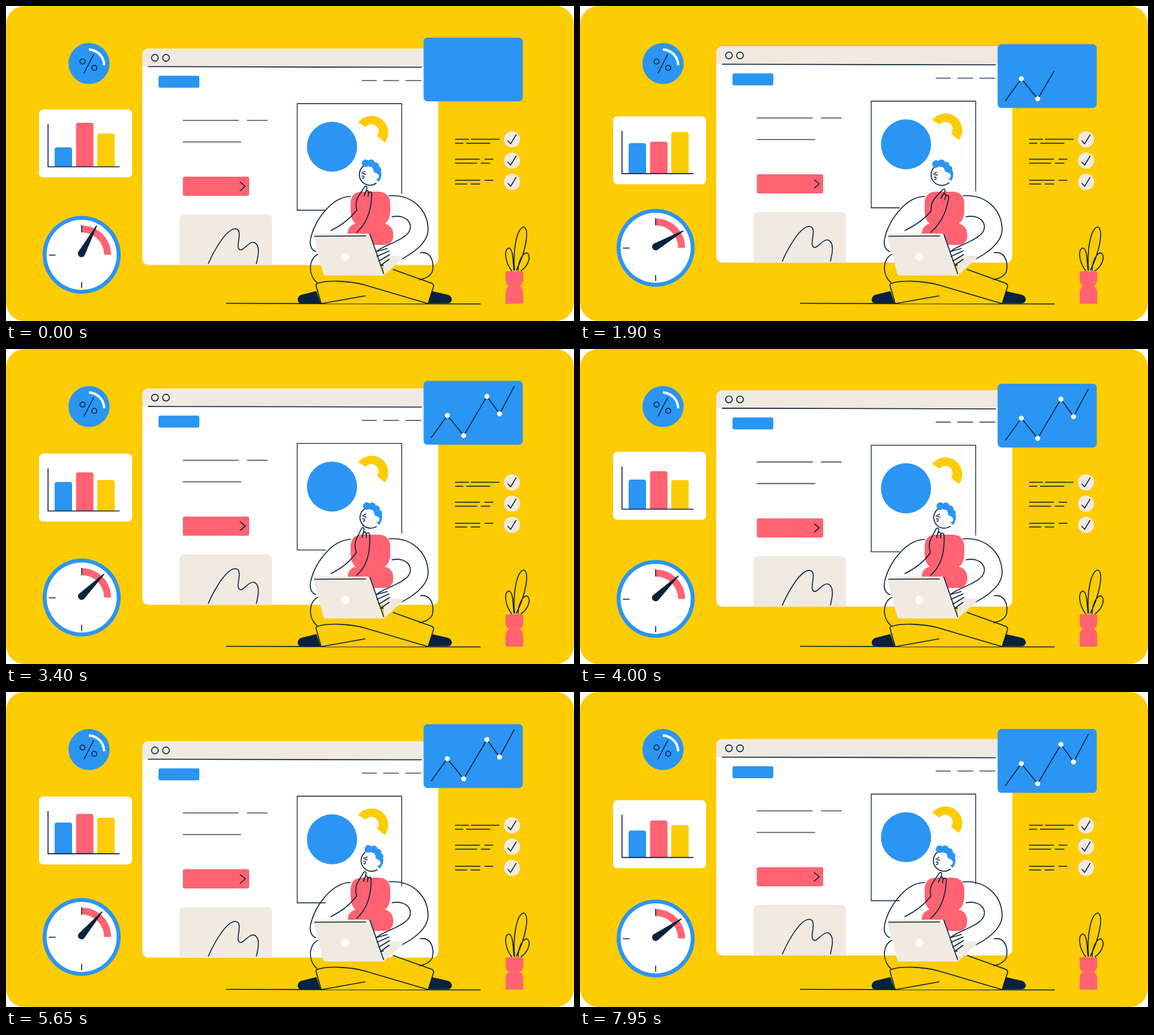
Animation, 946 px wide and 526 px high, one loop 8 s. Source, as an HTML page:

```html
<!DOCTYPE html>
<html lang="en">
<head>
<meta charset="utf-8">
<title>Workspace</title>
<style>
html, body { margin: 0; width: 100%; height: 100%; overflow: hidden; background: #fff; }
svg { display: block; width: 100%; height: 100%; }
.y { fill: #fdcc03; }
.b { fill: #2b95f3; }
.p { fill: #ff6371; }
.g { fill: #f0eae1; }
.w { fill: #fff; }
.d { fill: #08223f; }
.l { fill: none; stroke: #08223f; stroke-width: 1.6; stroke-linecap: round; stroke-linejoin: round; }
.s { stroke: #3c4c66; }
</style>
</head>
<body>
<svg viewBox="0 0 946 526">
  <defs>
    <clipPath id="page"><rect x="227" y="71" width="493" height="361.5" rx="10"/></clipPath>
  </defs>
  <rect class="y" width="946" height="526" rx="31"/>

  <g id="browser">
    <g clip-path="url(#page)">
      <rect class="w" x="227" y="71" width="493" height="362"/>
      <rect class="g" x="227" y="71" width="493" height="30.5"/>
      <rect class="g" x="289" y="348" width="154" height="100" rx="8"/>
      <path class="l" d="M337 430C349 403 368 372 382 372C395 373 384 397 387 404C392 416 404 391 414 395C423 400 421 414 417 430"/>
    </g>
    <path class="l" d="M237 101.2L692 102.3"/>
    <circle class="l" cx="248" cy="86.5" r="5.6"/>
    <circle class="l" cx="266.5" cy="86.5" r="5.6"/>
    <rect class="b" x="254" y="116.5" width="68" height="20" rx="3"/>
    <path class="l s" d="M593 124.5h24M629 124.5h25M666 124.5h25M295 191h92M402 191h33M295 227h96"/>
    <rect class="p" x="294.500" y="285" width="110.500" height="32" rx="3"/>
    <path class="l" d="M390 294L398.500 301L390 308.500"/>
    <path class="l" style="stroke-width:1.3" d="M532 341H485V163H659V313"/>
    <circle class="b" cx="543" cy="235" r="41.800"/>
    <path class="y" d="M586.500 194.500A27 27 0 0 1 631 228L618 217A11 11 0 0 0 599 202Z"/>
  </g>

  <g id="panel">
    <rect class="b" x="695.500" width="165.200" height="106.500" rx="6.500"/>
    <path class="l" id="trend"/>
    <g id="dots" class="w"></g>
  </g>

  <circle class="b" cx="138.300" cy="96" r="34.300"/>
  <path d="M138 72.500A27 27 0 0 1 163.500 99" fill="none" stroke="#fff" stroke-width="4"/>
  <path class="l" d="M146 81L130 112"/>
  <circle class="l" cx="127.500" cy="92.700" r="4.200"/>
  <circle class="l" cx="147" cy="103.300" r="4.200"/>

  <g id="chart">
    <rect class="w" x="55" width="155" height="113.500" rx="7"/>
    <g id="bars"></g>
    <path class="l" d="M70 25V95.700H188.500"/>
  </g>

  <g id="gauge">
    <circle class="b" r="65"/>
    <circle class="w" r="58.400"/>
    <path class="p" d="M0-49A49 49 0 0 1 49 0H37.500A37.500 37.500 0 0 0 0-37.500Z"/>
    <path class="l" d="M0-49V-38M-54 .5H-44M0 46V55"/>
    <path id="needle" class="d" d="M-6-1L-.8-54H.8L6-1A6 6 0 1 1-6-1Z"/>
  </g>

  <g id="list"></g>

  <path class="l y" style="fill:#fdcc03" d="M847 441C844 410 850 372 862 369C873 372 865 412 850 441M842 442C831 427 829 407 837 404C845 405 844 424 846 441M853 442C853 430 858 414 867 412C876 416 870 434 858 442"/>
  <path class="p" d="M834 443H859.500Q861.500 443 861.500 445V456Q861.500 465 855.500 467.500Q861.500 470 861.500 481V497H832V481Q832 470 838 467.500Q832 465 832 456V445Q832 443 834 443Z"/>

  <path class="l" d="M367 496.500L790 497.500"/>

  <g id="person">
    <path class="p" d="M594 310H619Q640 310 640 331V342Q640 357 631 363.500Q645 367 645 383Q645 399 628 399H586Q569 399 569 382Q569 367 582 363.500Q574 356 574 343V330Q574 310 594 310Z"/>
    <g id="head">
      <path class="w" d="M596 267A17 17 0 0 0 616.500 296L622 286L618 268Z"/>
      <path class="l" d="M596 267A17 17 0 0 0 616.500 296"/>
      <path class="b" d="M598 268Q608 266 611 271Q612 279 617 279Q622 282 620 287L616.500 290L621 293.500Q628 284 624 274L616 262L600 260Z"/>
      <circle class="b" cx="599" cy="262.500" r="6.300"/>
      <circle class="b" cx="608" cy="262.500" r="6.300"/>
      <circle class="b" cx="615.500" cy="266.500" r="5.500"/>
      <circle class="b" cx="620" cy="273" r="5"/>
      <circle class="w" cx="617" cy="284.500" r="4"/>
      <path class="l" style="stroke-width:1.4" d="M592.500 279L598 276M599 281L594.500 280M593 284Q597 283 596 286Q597 288 593.500 288"/>
    </g>
    <path class="l" d="M574 318C542 318 510 362 506.500 394Q507 407 516 410"/>
    <path class="l" id="arm"/>
    <g id="hand" class="l">
      <path d="M584 341Q581 326 587.500 317L597.500 301.500Q602 299 601 305L596.500 317M596.500 317Q598 309 602 308Q605 310 603 318M604 312Q606 309 608.500 311Q610 314 609 319"/>
    </g>
    <path class="l" d="M638 317C678 314 703 342 703 374C702 404 650 432 625 433M643 352C668 347 681 366 669 380C656 394 630 399 617 410"/>

    <path class="d" d="M517 476L491 482.500Q485 486 486 492Q487 496.500 493 496.500H524Z"/>
    <path class="d" d="M709 476L737 482.500Q743 486 742.500 491Q741 496.500 735 496.500H704Z"/>
    <path class="y" d="M516 464Q514 453 528 449L630 450L645 440L712 465L703 497H525Z"/>
    <path class="l" d="M521 414C504 420 502 448 518 462M690 412C706 409 714 425 710 444Q705 454 689 457"/>
    <path class="l" d="M645 440L709 463Q713 465 712 469L703 497L598 466C570 458 535 458 519 463Q515 464 517 469L525 497L598 484"/>

    <path class="g" d="M629 417H659Q664 418 660 422L629 450Z"/>
    <path class="g" d="M514 380H602Q606 380 607 384L631 450H533Q529 450 528 446L512 384Q511 380 514 380Z"/>
    <path class="l" d="M514 384.500L599 384M606 381L629 447"/>
    <circle class="w" cx="565" cy="419" r="6.800"/>
    <path class="l" d="M617 410L635 405M618 418L638 409M621 426L639 415M624 433L638 423"/>
  </g>
</svg>
<script>
const LOOP = 8000;
const NS = 'http://www.w3.org/2000/svg';
const $ = id => document.getElementById(id);
const mix = (a, b, k) => a + (b - a) * k;
const clamp = v => Math.max(0, Math.min(1, v));
const smooth = v => v * v * (3 - 2 * v);

function add(parent, tag, attrs) {
  const el = document.createElementNS(NS, tag);
  for (const k in attrs) el.setAttribute(k, attrs[k]);
  return parent.appendChild(el);
}

// Smooth drift through a few poses
function track(times, vals) {
  const last = times.length - 1;
  const slope = i => {
    const a = Math.max(0, i - 1), b = Math.min(last, i + 1);
    return (vals[b] - vals[a]) / (times[b] - times[a]);
  };
  return t => {
    let i = 0;
    while (i < last - 1 && t > times[i + 1]) i++;
    const h = times[i + 1] - times[i], k = clamp((t - times[i]) / h), q = 1 - k;
    return vals[i] * (1 + 2 * k) * q * q + vals[i + 1] * k * k * (3 - 2 * k)
      + h * k * q * (slope(i) * q - slope(i + 1) * k);
  };
}

const T = [0, 1900, 3400, 4650, 5650, 6800, 7950];
const pose = (...vals) => track(T, vals);

const browserY = pose(0, -4, -5.3, 2.5, 11, 15, 7.5);
const panelY = track(
  [0, 1900, 2500, 2750, 3400, 3850, 4650, 5100, 5650, 5950, 6400, 6800, 7300, 7700, 7950],
  [52.7, 63.8, 51, 49, 53.3, 57, 60.7, 58.5, 53.7, 48.5, 45.5, 46, 49, 56.5, 61.8]);
const chartY = pose(172.8, 184.2, 174.8, 170, 174.4, 182, 180.7);
const gaugeY = pose(415.5, 403.7, 415, 417.2, 409, 405.5, 411.5);
const needle = pose(28.5, 60, 45, 48, 40.5, 43.5, 54);
const nod = pose(0, -7, 2, 0, 5.5, 9, 0);
const wave = pose(0, 10, -6.5, -1.5, -2, 9, 1.5);

const bars = [
  [81, 'b', pose(32.5, 51, 48.5, 51, 52, 37, 45.2)],
  [116.7, 'p', pose(73.5, 53.3, 64.5, 61.5, 66.7, 70.3, 62)],
  [152, 'y', pose(55.5, 69.5, 51.8, 48.3, 60, 65.7, 54.2)]
].map(([x, c, height]) => ({ x, height, el: add($('bars'), 'path', { class: c }) }));

const pts = [[708.5, 94.5], [735, 57.7], [762.3, 91.3], [801, 25.8], [822, 55], [846.5, 9]];
const dots = pts.slice(1, 5).map(([x, y]) => add($('dots'), 'circle', { cx: x, cy: y }));
const lens = pts.slice(1).map(([x, y], i) => Math.hypot(x - pts[i][0], y - pts[i][1]));
const total = lens.reduce((a, b) => a + b);

['M748.500 222.500h22M775 222.500h46.500M748.500 229.300h12.500M767 229.300h39',
 'M748.500 255.800h40M797.500 255.800h13.500M748.500 262.500h35.500M791.500 262.500h14.500',
 'M748.500 291h41M797.500 291h13.500M748.500 297.300h19M774.500 297.300h14.500'
].forEach((d, i) => {
  const y = 222.7 + i * 35.5;
  add($('list'), 'path', { class: 'l', d });
  add($('list'), 'circle', { class: 'g', cx: 842.8, cy: y, r: 13.4 });
  add($('list'), 'path', { class: 'l', d: `M836 ${y + 2.5}l4.500 5l9-15` });
});

function turn(x, y, deg) {
  const a = deg * Math.PI / 180, dx = x - 575, dy = y - 345;
  return [575 + dx * Math.cos(a) - dy * Math.sin(a), 345 + dx * Math.sin(a) + dy * Math.cos(a)];
}

function drawTrend(t) {
  let left = total * smooth(clamp((t - 550) / 2500));
  let d = '';
  dots.forEach(c => c.setAttribute('r', 0));
  if (left > 0) {
    d = 'M' + pts[0];
    for (let i = 0; i < lens.length && left > 0; i++) {
      const k = Math.min(1, left / lens[i]);
      d += `L${mix(pts[i][0], pts[i + 1][0], k)} ${mix(pts[i][1], pts[i + 1][1], k)}`;
      left -= lens[i];
      if (dots[i]) dots[i].setAttribute('r', 4.2 * clamp(left / 8));
    }
  }
  $('trend').setAttribute('d', d);
}

function draw(t) {
  const move = (id, v) => $(id).setAttribute('transform', v);
  move('browser', `translate(0 ${browserY(t)})`);
  move('panel', `translate(0 ${panelY(t)})`);
  move('chart', `translate(0 ${chartY(t)})`);
  move('gauge', `translate(126 ${gaugeY(t)})`);
  move('needle', `translate(-.8 -1.200) rotate(${needle(t)})`);
  move('head', `rotate(${nod(t)} 607 312)`);
  const a = wave(t);
  move('hand', `rotate(${a} 575 345)`);
  $('arm').setAttribute('d',
    `M541 375Q568 362 ${turn(584, 341, a)}M584 378Q607 358 ${turn(609, 319, a)}`);
  for (const { x, height, el } of bars) {
    const h = height(t);
    el.setAttribute('d', `M${x} 95.700v${4 - h}q0-4 4-4h21q4 0 4 4v${h - 4}z`);
  }
  drawTrend(t);
}

function frame() {
  draw(performance.now() % LOOP);
  requestAnimationFrame(frame);
}
frame();
</script>
</body>
</html>
```
